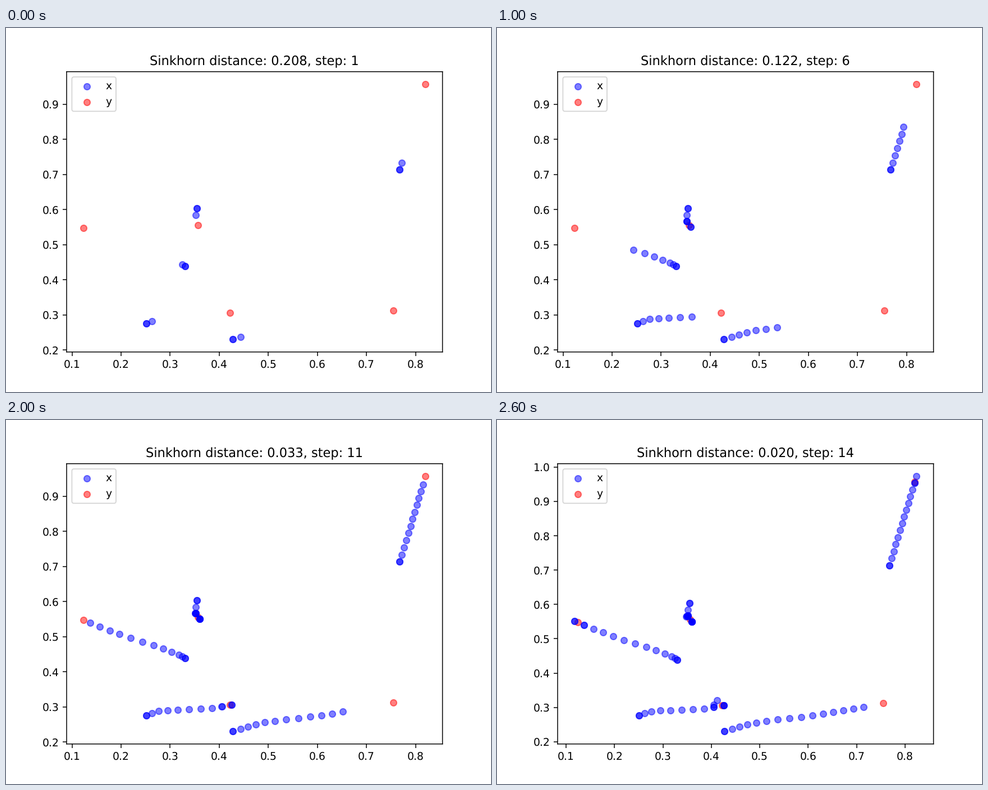
A matplotlib script for the animation above (2800 ms loop, 864x648 px).

```python
import numpy as np
import matplotlib.pyplot as plt
from matplotlib.animation import FuncAnimation

STEPS = 14
MARGIN = 0.05

# Smooth, unsnapped lines and unhinted letters
plt.rcParams["path.snap"] = False
plt.rcParams["text.hinting"] = "none"

targets = np.array([(0.1238, 0.5477), (0.3566, 0.5558), (0.4222, 0.3056),
                    (0.7550, 0.3120), (0.8201, 0.9569)])


def glide(t, knots):
    """Smooth cubic path through a few (step, x, y) knots."""
    knots = np.array(knots)
    steps, pos = knots[:, 0], knots[:, 1:]
    slope = np.gradient(pos, steps, axis=0)
    i = np.clip(np.searchsorted(steps, t, side="right") - 1, 0, len(steps) - 2)
    h = (steps[i + 1] - steps[i])[:, None]
    u = (t - steps[i])[:, None] / h
    return (pos[i] * (1 + 2 * u) * (1 - u) ** 2 + pos[i + 1] * u * u * (3 - 2 * u)
            + h * u * (1 - u) * (slope[i] * (1 - u) - slope[i + 1] * u))


def journey(*knots, turn=0.0):
    """Glide to the last knot, then overshoot back and forth.

    The direction of the hops turns ever faster, by turn * hop ** 3 degrees.
    """
    arrival = knots[-1][0]
    pts = list(glide(np.arange(arrival + 1), knots))
    home, swing = pts[-1], pts[-2] - pts[-1]
    for k in range(1, STEPS - arrival + 1):
        if k % 2 == 0:
            pts.append(home)
            continue
        a = np.radians(turn * ((k + 1) // 2) ** 3)
        spin = np.array([(np.cos(a), -np.sin(a)), (np.sin(a), np.cos(a))])
        pts.append(home + spin @ swing)
    return np.array(pts)


# Indexed as step, point, coordinate
trails = np.stack([
    journey((0, 0.7675, 0.7138), (6, 0.7940, 0.8358), (13, 0.8234, 0.9728)),
    journey((0, 0.3299, 0.4393), (2, 0.3174, 0.4489), (4, 0.2859, 0.4660),
            (8, 0.1970, 0.5073), (12, 0.1178, 0.5508)),
    journey((0, 0.3546, 0.6034), (1, 0.3518, 0.5842), (2, 0.3518, 0.5670),
            (3, 0.3597, 0.5502), turn=0.07),
    journey((0, 0.2510, 0.2760), (2, 0.2762, 0.2880), (4, 0.3159, 0.2921),
            (7, 0.3848, 0.2968), (9, 0.4253, 0.3054), turn=-2.3),
    journey((0, 0.4273, 0.2307), (4, 0.4926, 0.2556), (9, 0.6085, 0.2761),
            (14, 0.7137, 0.3018)),
], axis=1)


def distance(step):
    return np.interp(step, [1, 4, 6, 9, 11, 12, 14],
                     [0.208, 0.163, 0.122, 0.062, 0.033, 0.028, 0.020])


fig, ax = plt.subplots(figsize=(6.4, 4.8), dpi=135)
ax.scatter(*trails[0].T, color="blue", alpha=0.5, label="x")
ax.scatter(*targets.T, color="red", alpha=0.5, label="y")
trail = ax.scatter([], [], color="blue", alpha=0.5)
ax.legend(loc="upper left")


def update(i):
    step = i + 1
    shown = trails[:step + 1].reshape(-1, 2)
    trail.set_offsets(shown)
    every = np.vstack([shown, targets])
    low, high = every.min(axis=0), every.max(axis=0)
    pad = MARGIN * (high - low)
    ax.set_xlim(low[0] - pad[0], high[0] + pad[0])
    ax.set_ylim(low[1] - pad[1], high[1] + pad[1])
    ax.set_title(f"Sinkhorn distance: {distance(step):.3f}, step: {step}")
    return [trail]


anim = FuncAnimation(fig, update, frames=STEPS, interval=200, repeat=True)
plt.show()
```
